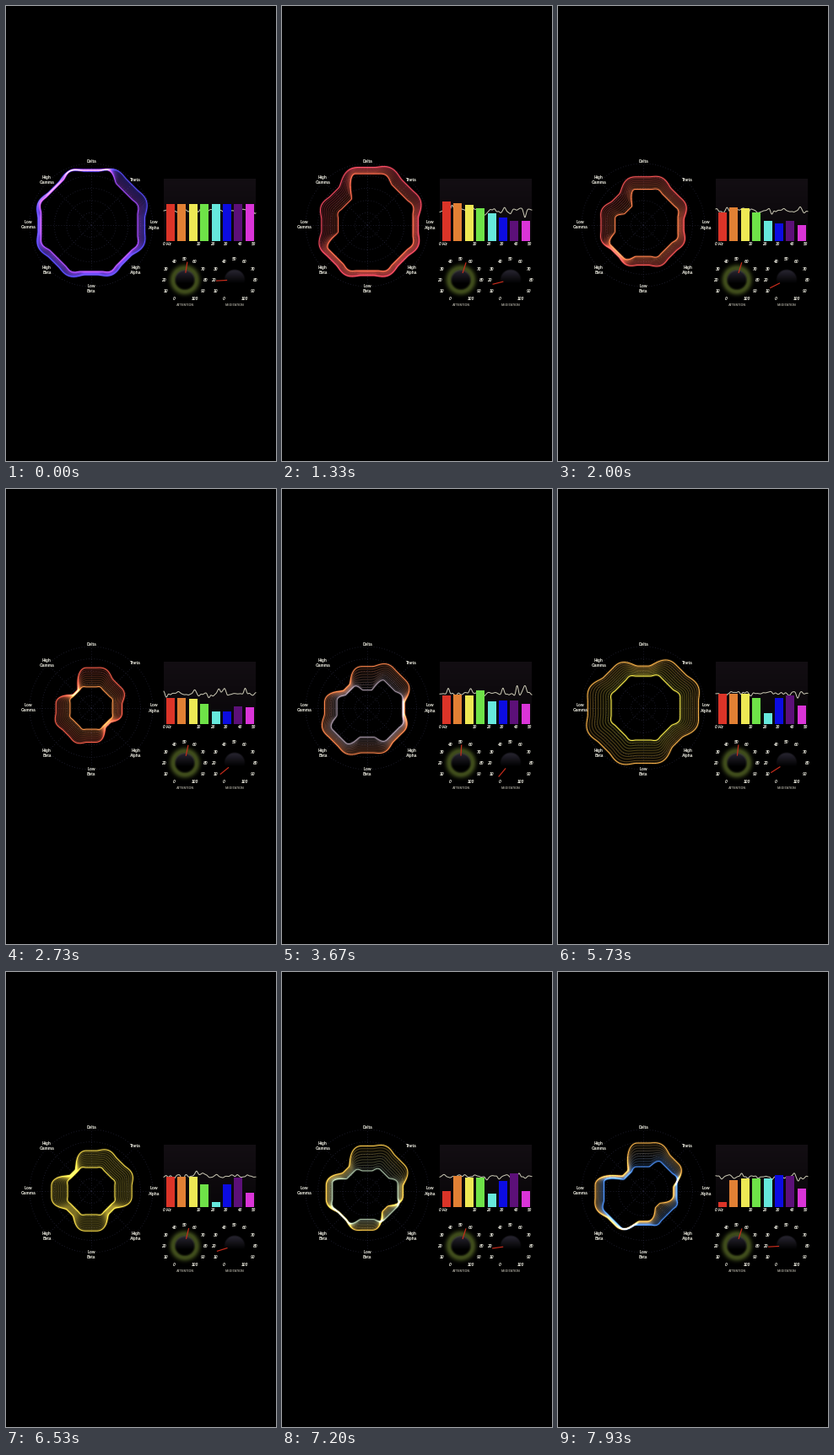
These frames come from a looping animation (320x540 px, 8 s). A matplotlib script:

```python
import colorsys
import numpy as np
import matplotlib.pyplot as plt
from matplotlib.animation import FuncAnimation
from matplotlib.patches import Rectangle

W, H, DPI = 320, 540, 80
FRAMES, INTERVAL = 125, 64
LOOP = FRAMES * INTERVAL
CX, CY = 101, 260
WHITE = "#efeee2"
rng = np.random.default_rng(12)


def profile(size, *dips, wrap=True):
    """Eight band values: one level with dips (position, depth, width)."""
    k = np.arange(8)
    out = np.full(8, float(size))
    for pos, depth, width in dips:
        d = (k - pos + 4) % 8 - 4 if wrap else k - pos
        out -= depth * np.exp(-(d / width) ** 2)
    return out


def levels(size, *dips):
    return profile(size, *dips, wrap=False)


def tints(*hues):
    return np.concatenate([colorsys.hsv_to_rgb(h, .7, .95) for h in hues])


# Poses: time, front outline, trailing outline, bar levels, their two hues.
# Bands run clockwise from the top: delta, theta, alpha, beta, gamma.
POSES = [
    (0, profile(63, (1, -5, .8), (3.5, 5, 1)),
     profile(55, (6.7, -6, 1.2), (0, -9, .6)),
     levels(44), tints(.68, .75)),
    (1330, profile(60, (.4, -11, .9), (6.5, 8, .9)),
     profile(54, (0, -8, .6), (6.5, 28, .85)),
     levels(47, (6.5, 24, 3.3)), tints(.98, .03)),
    (2730, profile(42, (2.8, 15, .8), (7, 16, .5), (0, -6, .5)),
     profile(25), levels(31, (4.5, 18, 1.5), (7, 10, 1)), tints(.02, .07)),
    (4530, profile(62, (7.7, 24, .85)),
     profile(50, (0, 30, .8), (6, 8, .5), (5, -10, .5)),
     levels(47, (0, 16, .6), (7, 9, 1)), tints(.09, .6)),
    (5730, profile(66, (7.8, 17, .85), (3, 9, .6)),
     profile(38, (1.7, -7, .7)),
     levels(36, (4, 23, .8), (7, 14, .7)), tints(.1, .155)),
    (6530, profile(49, (3, 15, .6), (5, 13, .6), (7, 18, .6)),
     profile(28), levels(36, (4, 30, .9), (7, 19, .6)), tints(.14, .145)),
    (7930, profile(60, (3, 36, 1.6), (7, 30, .6)),
     profile(40, (7, 14, .8), (0, 8, .6), (5.5, -14, .8)),
     levels(34, (0, 28, .6), (7, 12, .6), (5.5, -6, .8)), tints(.1, .6)),
]


def track(column, spread=0):
    """Values of one column with a varied row halfway between poses."""
    rows = np.array([p[column] for p in POSES], float).reshape(len(POSES), -1)
    mids = (rows[:-1] + rows[1:]) / 2
    out = np.empty((2 * len(rows) - 1, rows.shape[1]))
    out[::2] = rows
    out[1::2] = mids + spread * rng.uniform(-1, 1, mids.shape)
    return out


times = track(0)[:, 0]
front, trail = track(1, 6), track(2, 6)
bar_levels, hues = track(3, 5), track(4)


def ease(u):
    u = np.clip(u, 0, 1)
    return u * u * (3 - 2 * u)


def at(rows, t):
    i = min(np.searchsorted(times, t, "right") - 1, len(times) - 2)
    u = ease((t - times[i]) / (times[i + 1] - times[i]))
    return rows[i] * (1 - u) + rows[i + 1] * u


# --- band ring, drawn as additive light -----------------------------------
X0, X1, Y0, Y1 = 20, 186, 176, 344
GW, GH = X1 - X0, Y1 - Y0
LINES, SAMPLES = 10, 720
theta = np.linspace(0, 360, SAMPLES, endpoint=False)
sector = (theta // 45).astype(int)
offset = theta % 45
sin_t, cos_t = np.sin(np.radians(theta)), np.cos(np.radians(theta))


def outline(radii, flat):
    """Radius by angle: a flat edge per band, smoothly joined."""
    u = ease((offset - flat) / (45 - 2 * flat))
    here = radii[sector] / np.cos(np.radians(offset))
    after = radii[(sector + 1) % 8] / np.cos(np.radians(45 - offset))
    return here * (1 - u) + after * u


def splat(buf, x, y, weight, tint):
    ix, iy = np.floor(x).astype(int), np.floor(y).astype(int)
    fx, fy = x - ix, y - iy
    for dx, wx in ((0, 1 - fx), (1, fx)):
        for dy, wy in ((0, 1 - fy), (1, fy)):
            px_x = np.clip(ix + dx, 0, GW - 1)
            px_y = np.clip(iy + dy, 0, GH - 1)
            hit = np.bincount(px_y * GW + px_x, weight * wx * wy, GW * GH)
            buf += hit.reshape(GH, GW, 1) * tint


def blur(a):
    for axis in (0, 1):
        a = (np.roll(a, 1, axis) + 2 * a + np.roll(a, -1, axis)) / 4
    return a


def ring_image(t):
    tint = at(hues, t)
    first, last = outline(at(front, t), 7), outline(at(trail, t), 13)
    buf = np.zeros((GH, GW, 3))
    for k in range(LINES):
        u = k / (LINES - 1)
        r = first * (1 - u) + last * u
        x = CX - X0 + r * sin_t - .5
        y = CY - Y0 - r * cos_t - .5
        step = np.hypot(np.roll(x, -1) - x, np.roll(y, -1) - y)
        power = 1.2 if k in (0, LINES - 1) else .38
        splat(buf, x, y, power * step, tint[:3] * (1 - u) + tint[3:] * u)
    light = np.clip(.55 * buf + .65 * blur(buf), 0, 1)
    alpha = light.max(axis=2, keepdims=True)
    return np.concatenate([light / np.maximum(alpha, 1e-6), alpha], axis=2)


# --- stage ----------------------------------------------------------------
fig = plt.figure(figsize=(W / DPI, H / DPI), dpi=DPI, facecolor="black")
ax = fig.add_axes([0, 0, 1, 1])
ax.axis("off")


def px(v):
    return v * 72 / DPI


def label(x, y, text, size=4.8, style="normal", color=WHITE):
    ax.text(x, y - .5, text, fontsize=px(size), color=color, weight="bold",
            style=style, family="Liberation Sans", ha="center",
            va="center_baseline", zorder=8)


def picture(img, x0, x1, y0, y1, z):
    return ax.imshow(img, extent=(x0, x1, y1, y0), aspect="auto",
                     interpolation="nearest", zorder=z)


# Polar grid and band names
turn = np.linspace(0, 2 * np.pi, 200)
dots = dict(color="#26263a", lw=px(.8), ls=(0, (1, 3)), zorder=1)
for r in np.linspace(14.6, 73, 5):
    ax.plot(CX + r * np.sin(turn), CY + r * np.cos(turn), **dots)
BANDS = ["Delta", "Theta", "Low Alpha", "High Alpha",
         "Low Beta", "High Beta", "Low Gamma", "High Gamma"]
for k, name in enumerate(BANDS):
    a = k * np.pi / 4
    ax.plot([CX, CX + 73 * np.sin(a)], [CY, CY - 73 * np.cos(a)], **dots)
    words = name.split()
    for i, word in enumerate(words):
        label(CX + 74.5 * np.sin(a), CY - 76 * np.cos(a)
              + 6 * (i - (len(words) - 1) / 2), word)

ring = picture(np.zeros((GH, GW, 4)), X0, X1, Y0, Y1, 3)

# Spectrum panel
fade = np.linspace(1, .45, 74)[:, None, None]
picture(fade * np.array([.075, .055, .075]), 187, 296, 205, 279, 1)
BAR_COLORS = ["#dc3428", "#e28034", "#eee854", "#6ee248",
              "#66e8dc", "#0c0ce2", "#5c1078", "#da34d8"]
bars = []
for i, color in enumerate(BAR_COLORS):
    bar = Rectangle((190 + 13.4 * i, 279), 10, 0, fc=color, lw=0, zorder=5)
    bars.append(ax.add_patch(bar))
label(191, 283, "0 Hz", style="italic")
for i in range(1, 6):
    label(212.3 + 16.2 * i, 283, str(10 * i), style="italic")

wave_x = np.arange(187, 296.5, .5)
noise = rng.normal(0, 1, 500)
noise = 1.7 * noise + .4 * noise ** 3
wave, = ax.plot([], [], color="#cac8b4", lw=px(1), zorder=4)


def wave_y(t):
    pos = (wave_x - 187 + t * .09) / 2.4
    y = np.interp(pos, np.arange(len(noise)), noise)
    y = np.convolve(np.pad(y, 4, "edge"), np.hanning(11)[1:-1] / 5, "valid")
    return 242.5 + np.clip(y, -9, 12)


# Dials
gy, gx = np.mgrid[-22:22, -22:22] + .5
dist = np.hypot(gx, gy)
halo = np.exp(-((dist - 14) / 4.2) ** 2) * np.clip((dist - 9.5) / 3, 0, 1)
disc = np.clip((13 - dist) / 2, 0, 1) * np.clip(.3 - gy / 14, 0, 1)
shade = disc[..., None] * np.array([.14, .13, .17])
green = halo[..., None] * np.array([.25, .30, .11])
needles = []
for cx, glow, name in [(211.5, shade + green, "ATTENTION"),
                       (270.5, shade, "MEDITATION")]:
    picture(glow, cx - 22, cx + 22, 303, 347, 1)
    for v in range(0, 101, 10):
        a = np.radians(240 - 3 * v)
        label(cx + 25 * np.cos(a), 325.5 - 25 * np.sin(a), str(v), 5, "italic")
    label(cx + .5, 354.5, name, 3.8, color="#9c9a90")
    needle, = ax.plot([], [], color="#c82c1c", lw=px(1.2), zorder=6)
    needles.append((cx, needle))

ax.set_xlim(0, W)
ax.set_ylim(H, 0)


def dial_values(t):
    return (53 + 3 * np.sin(2 * np.pi * t / 6000),
            11 + 8 * np.cos(2 * np.pi * t / LOOP))


def draw(i):
    t = i * INTERVAL
    ring.set_data(ring_image(t))
    for bar, h in zip(bars, at(bar_levels, t)):
        bar.set_height(-h)
    wave.set_data(wave_x, wave_y(t))
    reach = np.array([9, 21])
    for (cx, needle), v in zip(needles, dial_values(t)):
        a = np.radians(240 - 3 * v)
        needle.set_data(cx + reach * np.cos(a), 325 - reach * np.sin(a))
    return [ring, wave, *bars, *(n for _, n in needles)]


anim = FuncAnimation(fig, draw, frames=FRAMES, interval=INTERVAL,
                     repeat=True, repeat_delay=0, blit=False)
plt.show()
```
